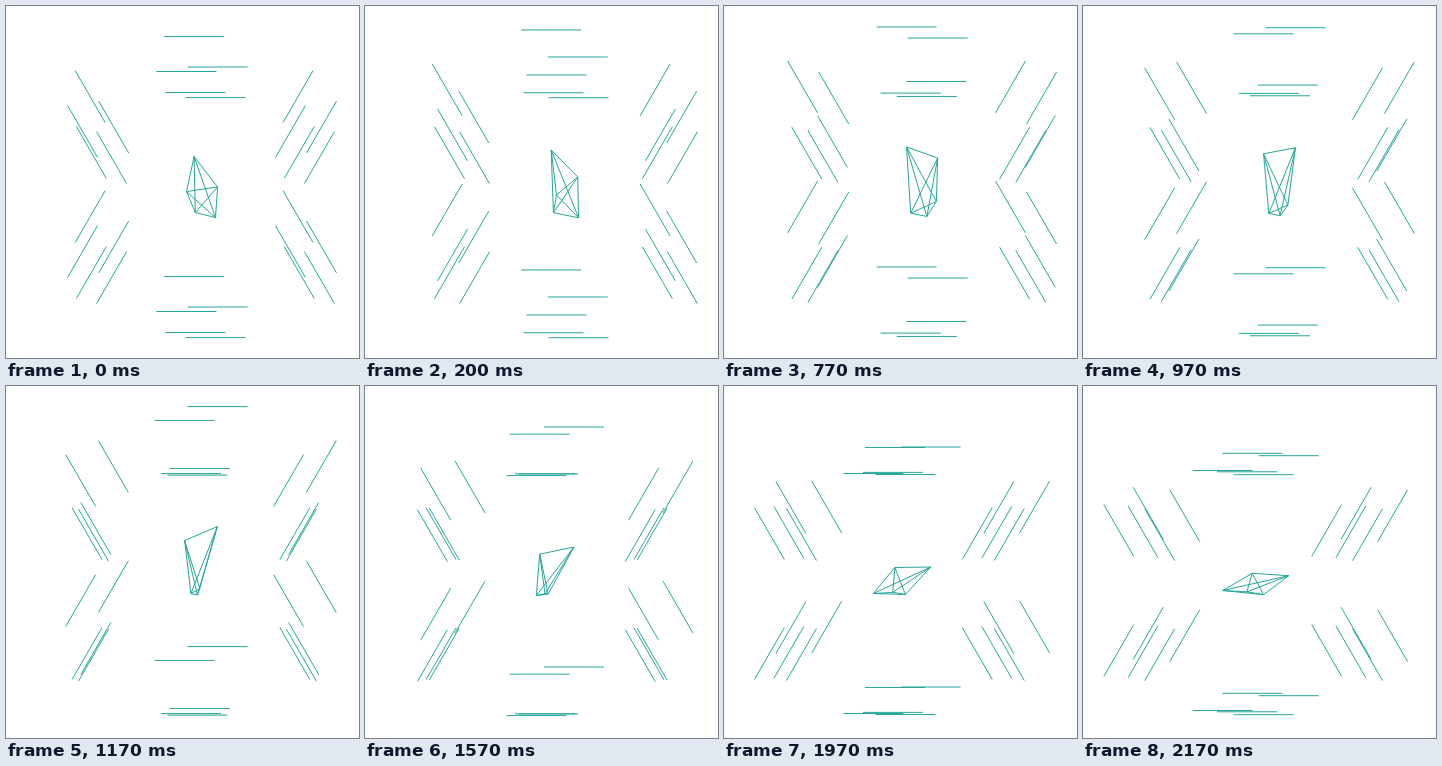
Write an HTML page with a canvas that moves like this. It is 353 px wide and 352 px high and loops after 2370 ms.

```html
<!DOCTYPE html>
<html lang="en">
<head>
<meta charset="utf-8">
<title>Bouncing points</title>
<style>
  html, body { margin: 0; width: 100%; height: 100%; overflow: hidden; background: #fff; }
  canvas { display: block; }
</style>
</head>
<body>
<canvas id="stage" width="353" height="352"></canvas>
<script>
const ctx = document.getElementById('stage').getContext('2d');
const LOOP = 2370;
const RADIUS = 120;
const HALF_LENGTH = 30;
const BOX = { left: 138.3, right: 214.3, top: 136.1, bottom: 212 };

// The picture holds between ticks: [start in ms, distance travelled in steps].
const ticks = [
  [0, 0], [200, 1], [560, 2], [770, 2.9], [970, 3.93], [1170, 4.94],
  [1370, 5.96], [1570, 6.98], [1770, 7.98], [1970, 8.98], [2170, 9.85]
];

const points = [
  { x: 188.1, y: 150.6, vx: -1.92, vy: -6.67 },
  { x: 211.6, y: 181, vx: 1.15, vy: -10 },
  { x: 180.5, y: 185.5, vx: 11, vy: 3.45 },
  { x: 189.3, y: 206.5, vx: -0.88, vy: 0.22 },
  { x: 209.5, y: 211.6, vx: 5.6, vy: 0.67 }
];

function bounce(value, low, high) {
  if (value < low) return 2 * low - value;
  if (value > high) return 2 * high - value;
  return value;
}

function line(x1, y1, x2, y2) {
  ctx.beginPath();
  ctx.moveTo(x1, y1);
  ctx.lineTo(x2, y2);
  ctx.stroke();
}

// Six dashes around a point, each tilted by twice its bearing.
function drawDashes(p) {
  for (let i = 0; i < 6; i++) {
    const bearing = Math.PI / 6 + i * Math.PI / 3;
    const x = p.x + RADIUS * Math.cos(bearing);
    const y = p.y + RADIUS * Math.sin(bearing);
    const dx = HALF_LENGTH * Math.cos(2 * bearing);
    const dy = HALF_LENGTH * Math.sin(2 * bearing);
    line(x - dx, y - dy, x + dx, y + dy);
  }
}

function draw(time) {
  const steps = ticks.filter(([start]) => start <= time).pop()[1];
  const moved = points.map(p => ({
    x: bounce(p.x + p.vx * steps, BOX.left, BOX.right),
    y: bounce(p.y + p.vy * steps, BOX.top, BOX.bottom)
  }));

  ctx.fillStyle = '#fff';
  ctx.fillRect(0, 0, 353, 352);
  ctx.strokeStyle = '#26a69a';
  ctx.lineWidth = 1;
  moved.forEach((p, i) => {
    drawDashes(p);
    moved.slice(i + 1).forEach(q => line(p.x, p.y, q.x, q.y));
  });
}

function animate() {
  draw(performance.now() % LOOP);
  requestAnimationFrame(animate);
}
animate();
</script>
</body>
</html>
```
